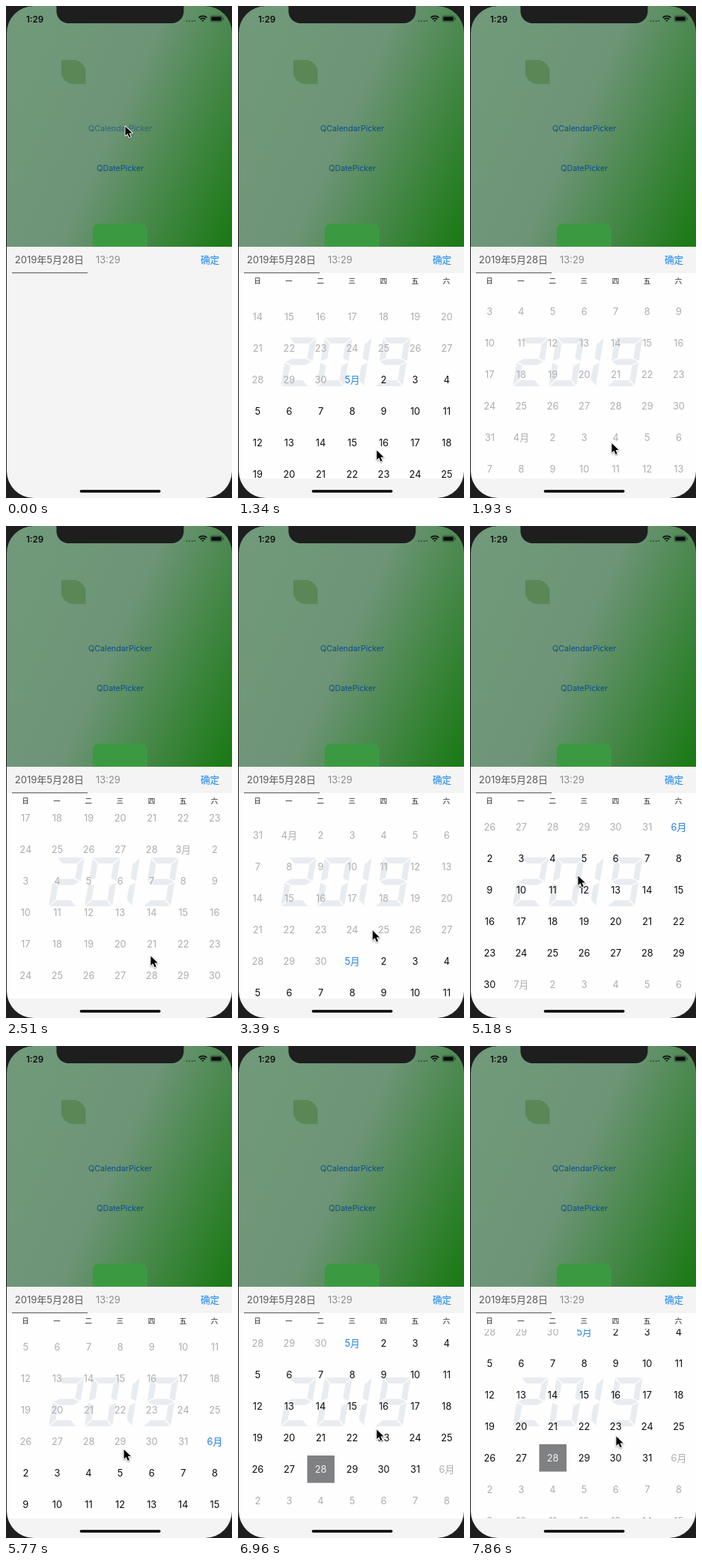
Animation of 302 by 656 pixels, one loop 8 s. Source, as an HTML page with a canvas:

```html
<!DOCTYPE html>
<html lang="zh">
<head>
<meta charset="utf-8">
<title>Calendar picker</title>
<style>
html, body { margin: 0; width: 100%; height: 100%; overflow: hidden; background: #1e1e1f; }
canvas { display: block; width: 302px; height: 656px; }
</style>
</head>
<body>
<canvas id="stage"></canvas>
<script>
const W = 302, H = 656, LOOP = 8, TICKS = 54;
const ROW = 42, COL = 42.1, REST = 396;
const INK = '#0a0f0b', BEZEL = '#1e1e1f';
const SANS = 'Inter, "Noto Sans CJK SC", "Noto Sans CJK", sans-serif';
const canvas = document.getElementById('stage');
const dpr = window.devicePixelRatio || 1;
canvas.width = W * dpr;
canvas.height = H * dpr;
const c = canvas.getContext('2d');

const clamp = u => Math.max(0, Math.min(1, u));
const ease = (t, start, length) => {
  const u = clamp((t - start) / length);
  return u * u * (3 - 2 * u);
};
const flick = (t, start, tau) => 1 - Math.exp(-Math.max(0, t - start) / tau);

// y of the week that starts on 28 April: a long flick back, then paging to June and to May
function weekTop(t) {
  const back = 437 * flick(Math.min(t, 2.6), 1.213, 0.45);
  const june = 4 * ROW * (ease(t, 5.08, 1) - ease(t, 4.28, 0.55));
  return REST + back * (1 - ease(t, 2.6, 1.5)) + june - 15 * ease(t, 7.3, 0.5);
}

// Seconds, x, y of the pointer tip
const path = [
  [0.15, 159, 160], [1, 183, 485], [1.33, 185, 592], [2.52, 193, 573], [4.29, 166, 505],
  [4.75, 147, 430], [5.18, 144, 466], [6.2, 165, 580], [6.96, 185, 511], [7.86, 195, 520]
];

function pointer(t) {
  let [, x, y] = path[0];
  for (let i = 1; i < path.length; i++) {
    const [from, x0, y0] = path[i - 1], [to, x1, y1] = path[i];
    const u = ease(t, from, to - from);
    x += (x1 - x0) * u;
    y += (y1 - y0) * u;
  }
  return [x, y];
}

function rect(x, y, w, h, fill) {
  c.fillStyle = fill;
  c.fillRect(x, y, w, h);
}

function round(x, y, w, h, r, fill) {
  c.beginPath();
  c.roundRect(x, y, w, h, r);
  c.fillStyle = fill;
  c.fill();
}

function poly(points, fill) {
  c.beginPath();
  points.forEach(([x, y]) => c.lineTo(x, y));
  c.closePath();
  c.fillStyle = fill;
  c.fill();
}

function text(s, x, y, size, fill, align = 'center', weight = 400) {
  c.font = `${weight} ${size}px ${SANS}`;
  c.textAlign = align;
  c.fillStyle = fill;
  c.fillText(s, x, y + size * 0.36);
}

function backdrop(pressed) {
  c.save();
  c.scale(W, H);
  const g = c.createLinearGradient(0, 0, 1, 1);
  g.addColorStop(0, '#719a7b');
  g.addColorStop(0.36, '#6d9476');
  g.addColorStop(0.73, '#1b7a16');
  c.fillStyle = g;
  c.fillRect(0, 0, 1, 1);
  c.restore();
  round(74, 72, 32.5, 32, [0, 16, 0, 16], '#5a8755');
  round(116, 290, 73, 60, 9, '#3b9a41');
  text('QCalendarPicker', 152.7, 163, 10.7, pressed ? '#2a6580' : '#0b4e8e');
  text('QDatePicker', 152.7, 216.5, 10.7, '#0b4e8e');
}

function statusBar() {
  text('1:29', 38.5, 17.5, 11.5, INK, 'center', 600);
  for (let i = 0; i < 4; i++) rect(240.5 + i * 3.6, 19, 2, 2, 'rgba(20,50,25,.5)');
  c.strokeStyle = c.fillStyle = INK;
  c.lineWidth = 1.8;
  for (const r of [1.3, 4.6, 7.6]) {
    c.beginPath();
    c.arc(263, 21, r, -Math.PI * 0.75, -Math.PI * 0.25);
    c.stroke();
  }
  c.lineWidth = 0.8;
  c.strokeStyle = 'rgba(10,15,11,.5)';
  c.beginPath();
  c.roundRect(272.9, 12.9, 16.2, 8.2, 2.4);
  c.stroke();
  round(274.2, 14.2, 13.6, 5.6, 1.4, INK);
  rect(290, 15.6, 1, 2.8, 'rgba(10,15,11,.5)');
}

// Slanted seven-segment digit; segments are named a to g
function digit(x, names) {
  const w = 37, h = 65, m = h / 2, d = 8, gap = 1;
  const flipX = s => s.map(([px, py]) => [w - px, py]);
  const flipY = s => s.map(([px, py]) => [px, h - py]);
  const a = [[gap, 0], [w - gap, 0], [w - d - gap, d], [d + gap, d]];
  const f = [[0, gap], [d, d + gap], [d, m - d / 2 - gap], [0, m - gap]];
  const half = [[gap, m], [d + gap, m - d / 2], [w - d - gap, m - d / 2], [w - gap, m]];
  const b = flipX(f);
  const shapes = { a, b, f, c: flipY(b), d: flipY(a), e: flipY(f), g: [...half, ...flipY(half).reverse()] };
  c.save();
  c.transform(1, 0, -0.17, 1, x + 11, 442);
  for (const n of names) poly(shapes[n], '#e8ecf0');
  c.restore();
}

function calendar(top, active) {
  rect(0, 356, W, 274, '#fefefe');
  digit(57, 'abged');
  digit(105, 'abcdef');
  digit(131, 'bc');
  digit(183, 'abcdfg');
  [...'日一二三四五六'].forEach((s, i) => text(s, 26 + i * COL, 367, 9.5, '#1c1c1c', 'center', 500));

  c.save();
  c.beginPath();
  c.rect(0, 377.5, W, 252.5);
  c.clip();
  const first = Math.floor((365 - top) / ROW);
  for (let row = first; row < first + 8; row++) {
    for (let col = 0; col < 7; col++) {
      const date = new Date(Date.UTC(2019, 3, 28 + row * 7 + col));
      const month = date.getUTCMonth() + 1, day = date.getUTCDate();
      const x = 26 + col * COL, y = top + row * ROW;
      const current = month === active;
      const picked = current && month === 5 && day === 28;
      if (picked) rect(x - 17.7, y - 18, 36.5, 36.5, '#7f8082');
      const fill = picked ? '#f2f2f2' : !current ? '#adadad' : day === 1 ? '#1f80ea' : '#0c0c0c';
      text(day === 1 ? month + '月' : day, x + 0.3, y + 0.3, 12.8, fill);
    }
  }
  c.restore();
}

function sheet(open, top, active) {
  rect(0, 321, W, H - 321, '#f4f4f4');
  if (open) calendar(top, active);
  text('2019年5月28日', 11.8, 338.4, 13, '#5c5c5c', 'left');
  text('13:29', 120, 338.4, 12.9, '#8c8c8c', 'left');
  text('确定', 272.6, 338, 12.7, '#1485f5');
  rect(8, 355, 101, 1.4, '#777b78');
  round(98.6, 645.3, 108, 3.5, 1.75, '#000');
}

function bezel() {
  c.beginPath();
  c.rect(0, 0, W, H);
  c.roundRect(1, 0, W - 1, H, 36);
  c.fillStyle = BEZEL;
  c.fill('evenodd');
  round(67.5, -20, 170, 43, 16, BEZEL);
}

function cursor([x, y]) {
  c.save();
  c.translate(x, y);
  c.scale(0.9, 0.9);
  c.beginPath();
  [[0.5, 0.5], [0.5, 14.5], [3.8, 11.5], [6.2, 17], [8.6, 16], [6.2, 10.6], [10.8, 10.6]]
    .forEach(p => c.lineTo(...p));
  c.closePath();
  c.lineJoin = 'round';
  c.lineWidth = 2.2;
  c.strokeStyle = '#fff';
  c.shadowColor = 'rgba(0,0,0,.4)';
  c.shadowBlur = 2 * dpr;
  c.shadowOffsetY = dpr;
  c.stroke();
  c.shadowColor = 'transparent';
  c.fillStyle = '#000';
  c.fill();
  c.restore();
}

function draw(t) {
  const open = t > 0;
  const active = t > 4.85 && t < 6.05 ? 6 : 5;
  c.setTransform(dpr, 0, 0, dpr, 0, 0);
  backdrop(!open);
  statusBar();
  sheet(open, weekTop(t), active);
  bezel();
  cursor(pointer(t));
}

function frame() {
  const t = performance.now() / 1000 % LOOP;
  const tick = Math.min(TICKS - 1, Math.floor((t + 0.02) * TICKS / LOOP));
  draw(tick * LOOP / TICKS);
  requestAnimationFrame(frame);
}

frame();
</script>
</body>
</html>
```
